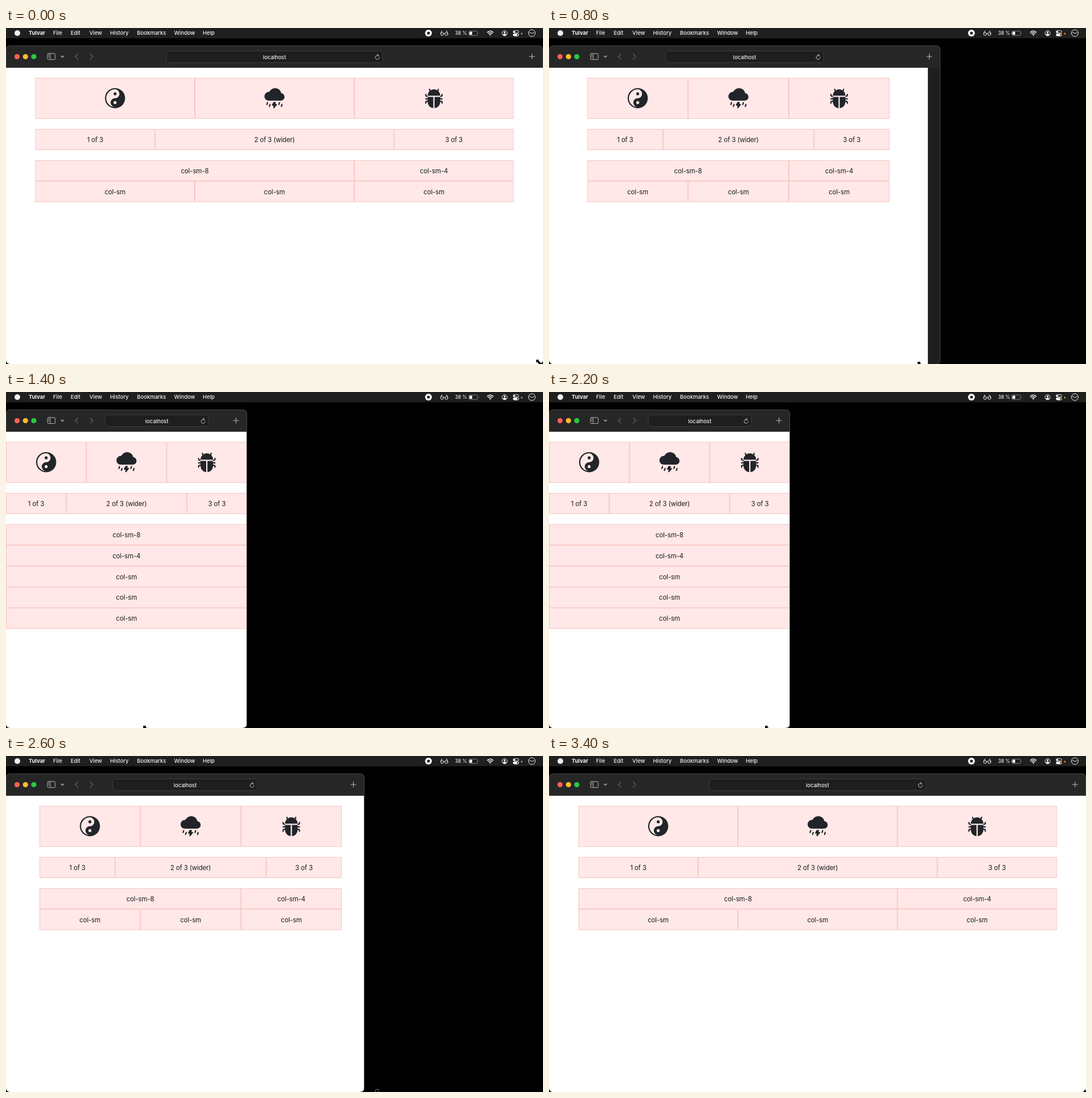
Write an HTML page that moves like this. It is 947 by 592 pixels and loops after 3500 ms.

```html
<!DOCTYPE html>
<html lang="en">
<head>
<meta charset="utf-8">
<title>Responsive grid</title>
<style>
html, body { margin: 0; width: 100%; height: 100%; overflow: hidden; background: #000; }
svg { display: block; width: 947px; height: 592px; font-family: Inter, "Liberation Sans", sans-serif; }
.menu text { font-size: 9.5px; font-weight: 500; fill: #f2f2f2; }
.line { fill: none; stroke-linecap: round; stroke-linejoin: round; }
.cell rect { fill: #ffe8e7; stroke: #f7bfbb; stroke-width: .9; }
.cell text { font-size: 11.5px; letter-spacing: -.15px; text-anchor: middle; fill: #181a1d; }
.icon { fill: #212529; }
</style>
</head>
<body>
<svg viewBox="0 0 947 592">
  <defs>
    <clipPath id="windowClip"><rect id="clipShape" y="31" height="561" rx="7"/></clipPath>
    <g id="yin" class="icon">
      <circle cx="8" cy="4.5" r="1.167"/>
      <path fill-rule="evenodd" d="M8 0a8 8 0 1 0 0 16A8 8 0 0 0 8 0M1 8a7 7 0 0 1 7-7 3.5 3.5 0 1 1 0 7 3.5 3.5 0 1 0 0 7 7 7 0 0 1-7-7m7 4.667a1.167 1.167 0 1 1 0-2.334 1.167 1.167 0 0 1 0 2.334"/>
    </g>
    <g id="storm" class="icon">
      <path d="M13.405 4.027a5 5 0 0 0-9.5-1.004A3.5 3.5 0 1 0 3.5 10H13a3 3 0 0 0 .405-5.973M7.053 11.276A.5.5 0 0 1 7.5 11h1a.5.5 0 0 1 .474.658l-.28.842H9.5a.5.5 0 0 1 .39.812l-2 2.5a.5.5 0 0 1-.875-.433L7.36 14H6.5a.5.5 0 0 1-.447-.724z"/>
      <path class="line" stroke="#212529" d="M2.5 11.5l-.5 1.5M12 11.5l-.5 1.5M4.5 13l-.5 1.5M14 13l-.5 1.5"/>
    </g>
    <g id="bug" class="icon">
      <path d="M4.978.855a.5.5 0 1 0-.956.29l.41 1.352A5 5 0 0 0 3 6h10a5 5 0 0 0-1.432-3.503l.41-1.352a.5.5 0 1 0-.956-.29l-.291.956A5 5 0 0 0 8 1a5 5 0 0 0-2.731.811z"/>
      <path d="M13 6v1H8.5v8.975A5 5 0 0 0 13 11h.5a.5.5 0 0 1 .5.5v.5a.5.5 0 1 0 1 0v-.5a1.5 1.5 0 0 0-1.5-1.5H13V9h1.5a.5.5 0 0 0 0-1H13V7h.5A1.5 1.5 0 0 0 15 5.5V5a.5.5 0 0 0-1 0v.5a.5.5 0 0 1-.5.5zM7.5 15.975V7H3V6h-.5a.5.5 0 0 1-.5-.5V5a.5.5 0 0 0-1 0v.5A1.5 1.5 0 0 0 2.5 7H3v1H1.5a.5.5 0 0 0 0 1H3v1h-.5A1.5 1.5 0 0 0 1 11.5v.5a.5.5 0 1 0 1 0v-.5a.5.5 0 0 1 .5-.5H3a5 5 0 0 0 4.5 4.975"/>
    </g>
  </defs>

  <rect width="947" height="592"/>

  <g class="menu">
    <rect width="947" height="18" fill="#1f1f1f"/>
    <circle cx="20" cy="9" r="5" fill="#f2f2f2"/>
    <text x="40" y="12.3" style="font-weight:700">Tulvar</text>
    <text x="83" y="12.3">File</text>
    <text x="114" y="12.3">Edit</text>
    <text x="147" y="12.3">View</text>
    <text x="183.5" y="12.3">History</text>
    <text x="231" y="12.3">Bookmarks</text>
    <text x="296.5" y="12.3">Window</text>
    <text x="347" y="12.3">Help</text>
    <circle cx="745" cy="9" r="6" fill="#fff"/>
    <rect x="742.7" y="6.7" width="4.6" height="4.6" rx=".8" fill="#1f1f1f"/>
    <g class="line" stroke="#eee">
      <circle cx="769" cy="10.5" r="2.6"/><circle cx="776.6" cy="10.5" r="2.6"/>
      <path d="M771.6 10q1.2-.9 2.4 0M766.6 9.5l1.6-4h1.2M779 9.5l-1.6-4h-1.2"/>
    </g>
    <text x="792" y="12.2" style="font-size:8.3px">38 %</text>
    <rect x="816" y="5.3" width="15.5" height="8" rx="2.2" fill="none" stroke="#8c8c8c" stroke-width=".9"/>
    <rect x="817.3" y="6.6" width="4.8" height="5.4" rx="1" fill="#fff"/>
    <path d="M833 7.8q1.6 1.5 0 3z" fill="#8c8c8c"/>
    <path class="line" stroke="#fff" stroke-width="1.5" d="M848.9 7.6q5.1-4.6 10.2 0M850.8 9.8q3.2-2.8 6.4 0"/>
    <path d="M852.1 11.4q1.9-1.5 3.8 0l-1.9 2z" fill="#fff"/>
    <circle cx="879.3" cy="9.3" r="4.5" fill="none" stroke="#fff"/>
    <circle cx="879.3" cy="7.9" r="1.6" fill="#fff"/>
    <path d="M876.2 11.8q3.1-3.4 6.2 0-3.1 3-6.2 0" fill="#fff"/>
    <rect x="894.3" y="4.7" width="10" height="4" rx="2" fill="none" stroke="#fff" stroke-width=".9"/>
    <circle cx="896.4" cy="6.7" r="1.5" fill="#fff"/>
    <rect x="894" y="9.8" width="10.6" height="4.6" rx="2.3" fill="#fff"/>
    <circle cx="902.2" cy="12.1" r="1.4" fill="#1f1f1f"/>
    <circle cx="909.6" cy="10" r="1.4" fill="#f09a2c"/>
    <circle cx="927.3" cy="9" r="6" fill="none" stroke="#eee"/>
    <path class="line" stroke="#eee" d="M923.2 7.6l4.1 2 3.8-1.5"/>
  </g>

  <g clip-path="url(#windowClip)">
    <rect y="31" width="947" height="561" fill="#1e1e1e"/>
    <rect y="31" width="947" height="39" fill="#262626"/>
    <rect id="page" y="70" height="522" fill="#fff"/>
    <g id="grid"></g>
    <circle cx="19.5" cy="50.5" r="4.6" fill="#fe5f57"/>
    <circle cx="34.3" cy="50.5" r="4.6" fill="#febc2e"/>
    <circle cx="49" cy="50.5" r="4.6" fill="#28c840"/>
    <g class="line" stroke="#b4b4b4">
      <rect x="73.2" y="45" width="13.6" height="10.6" rx="1.8"/>
      <path d="M78 45v10.6M75 47.4h1.3M75 49.4h1.3M75 51.4h1.3" stroke-width=".9"/>
      <path d="M97.2 49.2l2.3 2.3 2.3-2.3" stroke-width="1.3"/>
      <path d="M126.7 45.8l-4.6 4.5 4.6 4.5M148.6 45.8l4.6 4.5-4.6 4.5" stroke="#606060" stroke-width="1.2"/>
    </g>
    <rect id="address" y="40.5" height="20.5" rx="4.5" fill="#1e1e1e" stroke="#414141" stroke-width=".9"/>
    <text id="host" y="54.6" font-size="9.4" font-weight="500" text-anchor="middle" fill="#f0f0f0">localhost</text>
    <g id="reload" class="line" stroke="#c4c4c4">
      <path d="M2.9-1.2A3.5 3.5 0 1 0 3.5 1M.2-5.2L1.9-2.9-.7-1.7"/>
    </g>
    <path id="plus" class="line" stroke="#b4b4b4" stroke-width="1.1" d="M-4.6 0h9.2M0-4.6v9.2"/>
  </g>
  <path id="edge" fill="none" stroke="#4c4c4c" stroke-width=".9"/>
  <g id="pointer" stroke="#fff" stroke-width=".9" paint-order="stroke" stroke-linejoin="round">
    <path d="M0 0h5.2L3.9 1.5 8.1 5.7 9.6 4.3v5.2H4.4L5.8 8 1.5 3.8 0 5.2z"/>
  </g>
</svg>
<script>
const LOOP = 3500, STEP = 100;
const UNIT = 0.74; // page zoom

// [step, x] pairs, joined by straight lines
const edgeTrack = [[0, 947], [1, 944], [2, 935], [3, 919], [4, 896], [5, 870], [6, 839], [7, 768],
  [8, 690], [9, 600], [10, 510], [11, 440], [12, 425], [22, 425], [23, 437], [24, 495], [26, 632],
  [28, 757], [29, 812], [30, 861], [31, 897], [32, 925], [33, 941], [34, 947]];
const pointerTrack = [[0, 935], [2, 918], [4, 876], [6, 803], [8, 650], [10, 460], [11, 375],
  [12, 307], [13, 265], [14, 242], [16, 242], [18, 260], [20, 304], [22, 381], [23, 440],
  [26, 652], [28, 768], [30, 867], [31, 900], [32, 924], [33, 938], [34, 943]];

const $ = id => document.getElementById(id);
const set = (node, attrs) => {
  for (const key in attrs) node.setAttribute(key, attrs[key]);
  return node;
};
const add = (parent, tag, attrs = {}) =>
  parent.appendChild(set(document.createElementNS("http://www.w3.org/2000/svg", tag), attrs));

function at(track, step) {
  const i = track.findIndex(key => key[0] >= step);
  if (i <= 0) return track[0][1];
  const [s0, x0] = track[i - 1], [s1, x1] = track[i];
  return x0 + (x1 - x0) * (step - s0) / (s1 - s0);
}

function makeCell(label, icon) {
  const g = add($("grid"), "g", { class: "cell" });
  const box = add(g, "rect");
  const body = add(g, icon ? "use" : "text", icon ? { href: "#" + icon } : {});
  if (!icon) body.textContent = label;
  return { box, body, icon };
}

function placeCell({ box, body, icon }, x, y, width, height) {
  set(box, { x: x + .45, y: y + .45, width: width - .9, height: height - .9 });
  const cx = x + width / 2;
  if (icon) set(body, { transform: `translate(${cx - 17.8} ${y + 18.2}) scale(2.22)` });
  else set(body, { x: cx, y: y + 22.9 });
}

const icons = ["yin", "storm", "bug"].map(name => makeCell("", name));
const thirds = ["1 of 3", "2 of 3 (wider)", "3 of 3"].map(label => makeCell(label));
const pair = ["col-sm-8", "col-sm-4"].map(label => makeCell(label));
const trio = ["col-sm", "col-sm", "col-sm"].map(label => makeCell(label));

function layoutGrid(view) {
  const css = view / UNIT;
  const max = css >= 1200 ? 1140 : css >= 992 ? 960 : css >= 768 ? 720 : css >= 576 ? 540 : css;
  const width = max * UNIT, left = (view - width) / 2, line = 36.9;
  const row = (cells, shares, y, height) => {
    let x = left;
    cells.forEach((cell, i) => {
      const w = width * shares[i] / 12;
      placeCell(cell, x, y, w, height);
      x += w;
    });
  };
  row(icons, [4, 4, 4], 87.7, 72.4);
  row(thirds, [3, 6, 3], 178, line);
  if (css >= 576) {
    row(pair, [8, 4], 232.8, line);
    row(trio, [4, 4, 4], 232.8 + line, line);
  } else {
    [...pair, ...trio].forEach((cell, i) => row([cell], [12], 232.8 + i * line, line));
  }
}

function draw(time) {
  const step = Math.floor(time % LOOP / STEP);
  const edge = at(edgeTrack, step);
  const speed = edge - at(edgeTrack, Math.max(0, step - 1));
  // the page is resized slightly ahead of the window chrome
  const view = edge + speed * (step < 29 ? .28 : .1);

  set($("clipShape"), { width: edge });
  set($("page"), { width: view });
  layoutGrid(view);

  const barLeft = Math.max(175, edge * .2985), barWidth = Math.max(182, edge * .403);
  set($("address"), { x: barLeft, width: barWidth });
  set($("host"), { x: barLeft + barWidth / 2 });
  set($("reload"), { transform: `translate(${barLeft + barWidth - 9.4} 51)` });
  set($("plus"), { transform: `translate(${edge - 19.4} 50.2)` });
  set($("edge"), { d: `M.4 70V38.4q0-7 7-7H${edge - 7.4}q7 0 7 7V${edge < 946 ? "585q0 7-7 7" : "70"}` });

  const y = step === 0 ? 584.5 : step === 34 ? 589 : 588;
  set($("pointer"), { transform: `translate(${at(pointerTrack, step)} ${y})` });
}

const start = performance.now();
function tick() {
  draw(performance.now() - start);
  requestAnimationFrame(tick);
}
tick();
</script>
</body>
</html>
```
